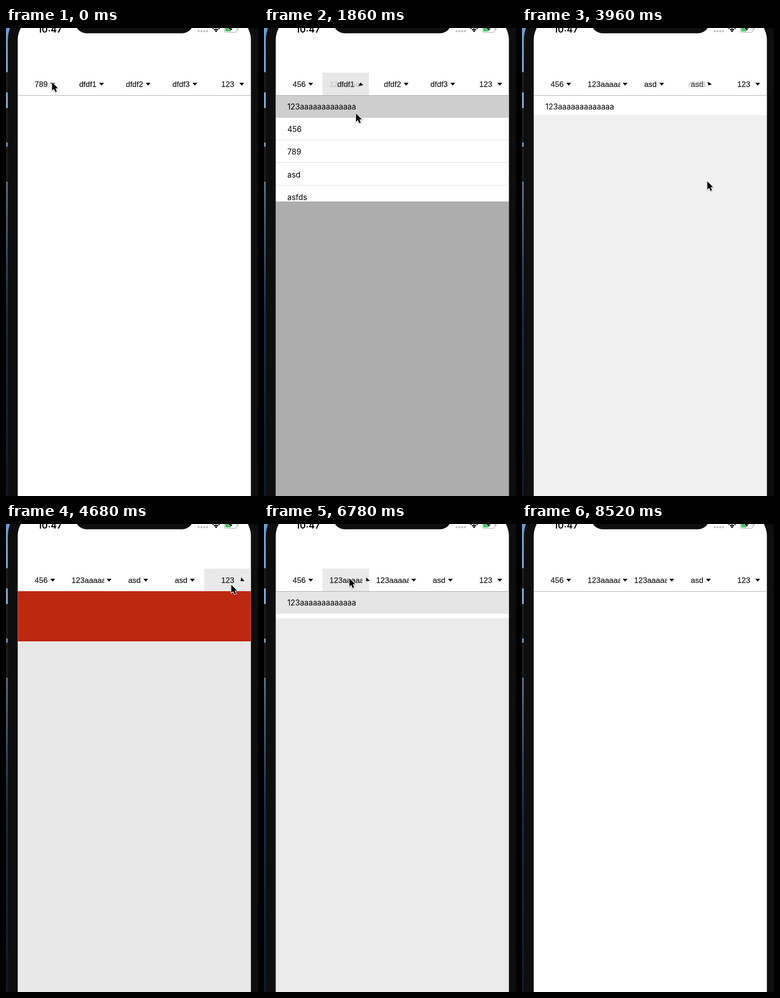
An HTML page with a canvas for the animation above (8.64 s loop, 550 by 1017 pixels).

```html
<!DOCTYPE html>
<html lang="en">
<head>
<meta charset="utf-8">
<title>Drop-down menu bar</title>
<style>
html, body { margin: 0; width: 100%; height: 100%; overflow: hidden; background: #0e0e0e; }
canvas { display: block; width: 550px; height: 1017px; }
</style>
</head>
<body>
<canvas id="stage"></canvas>
<script>
const W = 550, H = 1017, LOOP = 8640, STEP = 60;
const LEFT = 25.6, RIGHT = 534.5, SCREEN_TOP = -29.5, BEZEL = 21.6;
const BAR_TOP = 97, BAR_END = 146, TAB_W = (RIGHT - LEFT) / 5;
const ROW_H = 49.1, PANEL_H = 414, SLIDE = 300, DIM = .342, LABEL_MAX = 71;
const ROWS = ['123' + 'a'.repeat(13), '456', '789', 'asd', 'asfds'];
const START = ['789', 'dfdf1', 'dfdf2', 'dfdf3', '123'];
const TAB_FONT = '17px "Liberation Sans", Arial, sans-serif';
const ROW_FONT = '16.8px Inter, sans-serif';
const FRAME = '#0e0e0e';

// Each opened menu: its tab, times, height of the tap and the chosen row, if any.
const MENUS = [
  { tab: 0, open: 200, close: 850, tapY: 118, pick: 1 },
  { tab: 1, open: 1200, close: 1816, tapY: 125, pick: 0 },
  { tab: 2, open: 2180, close: 2560, tapY: 125, pick: 3 },
  { tab: 3, open: 2877, close: 3740, tapY: 132, pick: 3 },
  { tab: 4, open: 4579, close: 5245, tapY: 132, red: true },
  { tab: 2, open: 5850, close: 6230, tapY: 125, pick: 0 },
  { tab: 1, open: 6684, close: 8060, tapY: 118 }
];
const picks = menu => menu.pick !== undefined;

const canvas = document.getElementById('stage');
const ctx = canvas.getContext('2d');
const ratio = window.devicePixelRatio || 1;
canvas.width = W * ratio;
canvas.height = H * ratio;

const clamp = v => Math.min(1, Math.max(0, v));
const mix = (a, b, k) => a + (b - a) * k;
const ease = v => { const k = clamp(v); return k * k * (3 - 2 * k); };
const gray = v => { const n = Math.round(v); return `rgb(${n},${n},${n})`; };
const tabLeft = tab => LEFT + tab * TAB_W;

function rect(x, y, w, h, color) {
  ctx.fillStyle = color;
  ctx.fillRect(x, y, w, h);
}

function rounded(x, y, w, h, r, color) {
  ctx.beginPath();
  ctx.roundRect(x, y, w, h, r);
  if (color) {
    ctx.fillStyle = color;
    ctx.fill();
  }
}

function poly(points, color) {
  ctx.beginPath();
  points.forEach(([x, y]) => ctx.lineTo(x, y));
  ctx.closePath();
  ctx.fillStyle = color;
  ctx.fill();
}

function write(text, x, y, font, color = '#000', align = 'left') {
  ctx.font = font;
  ctx.textAlign = align;
  ctx.fillStyle = color;
  ctx.fillText(text, x, y);
}

// How far a menu is out, 0 to 1; lead starts the closing earlier.
function amount(menu, t, lead = 0) {
  return ease((t - menu.open) / SLIDE) * (1 - ease((t + lead - menu.close) / SLIDE));
}

function drawSurroundings() {
  const wall = ctx.createLinearGradient(0, 0, 0, H);
  wall.addColorStop(0, '#6d9ccf');
  wall.addColorStop(.17, '#7fa6cc');
  wall.addColorStop(.34, '#566878');
  wall.addColorStop(.6, '#14304e');
  wall.addColorStop(1, '#0b1a2c');
  rect(0, 0, W, H, wall);
  rect(0, 96, 4, 44, '#1c1c1c');
  rect(0, 174, 4, 75, '#1c1c1c');
  rect(0, 258, 4, 76, '#1c1c1c');
  rounded(LEFT - BEZEL, SCREEN_TOP - BEZEL, W + 100, H + 200, 56 + BEZEL, FRAME);
}

function drawStatus() {
  write('10:47', 96, 9.5, '600 20px Inter, sans-serif', '#000', 'center');
  rounded(151, -50, 258, 61.5, 25, FRAME);

  for (let i = 0; i < 4; i++) rounded(418 + i * 6.1, 4.6, 4.8, 4.8, 2.4, '#c4c4c4');

  ctx.strokeStyle = '#000';
  ctx.lineWidth = 2.6;
  for (const r of [6.5, 11]) {
    ctx.beginPath();
    ctx.arc(458.5, 9, r, -Math.PI * .75, -Math.PI * .25);
    ctx.stroke();
  }
  poly([[455.5, 6], [458.5, 4.8], [461.5, 6], [458.5, 9.2]], '#000');

  rounded(476.5, -5, 27.5, 14.5, 4);
  ctx.strokeStyle = '#a5a5a5';
  ctx.lineWidth = 1.2;
  ctx.stroke();
  rounded(478.5, -3, 12, 10.5, 2.5, '#35c759');
  rect(505.5, 0, 1.6, 4.5, '#a5a5a5');
  poly([[492, -6], [484.5, 3], [489.5, 3], [487.5, 9], [495.5, 0.5], [490.5, 0.5]], '#000');
  ctx.strokeStyle = '#fff';
  ctx.lineWidth = .8;
  ctx.stroke();
}

function labelState(tab, t) {
  let from = START[tab], to = from, k = 1;
  for (const m of MENUS) {
    if (m.tab !== tab || !picks(m) || t < m.close) continue;
    from = to;
    to = ROWS[m.pick];
    k = clamp((t - m.close) / SLIDE);
  }
  return { from, to, k };
}

function labelWidth(text) {
  ctx.font = TAB_FONT;
  return Math.min(LABEL_MAX, ctx.measureText(text).width);
}

function drawLabel(text, center, alpha) {
  const w = labelWidth(text), x = center - w / 2;
  ctx.save();
  ctx.globalAlpha = alpha;
  ctx.beginPath();
  ctx.rect(x - 1, BAR_TOP, w + 1.5, BAR_END - BAR_TOP);
  ctx.clip();
  write(text, x, 128, TAB_FONT, '#1a1a1a');
  ctx.strokeStyle = '#1a1a1a';
  ctx.lineWidth = .25;
  ctx.strokeText(text, x, 128);
  ctx.restore();
}

function drawTab(tab, t) {
  const x = tabLeft(tab), center = x + TAB_W / 2 + .3;
  let shade = 0, turn = 0;
  for (const m of MENUS.filter(m => m.tab === tab)) {
    shade += amount(m, t, picks(m) ? SLIDE / 2 : 0);
    turn += amount(m, t);
  }
  if (shade > 0) rect(x, BAR_TOP, TAB_W, BAR_END - BAR_TOP, gray(255 - 85 * shade));

  const { from, to, k } = labelState(tab, t);
  if (from !== to) drawLabel(from, center, 1 - k);
  drawLabel(to, center, from === to ? 1 : k);

  const half = mix(labelWidth(from), labelWidth(to), k) / 2;
  ctx.save();
  ctx.translate(center + half + (tab === 4 ? 16.5 : 11), 122);
  ctx.rotate(Math.PI * turn);
  poly([[-5.3, -3], [5.3, -3], [0, 3.3]], '#000');
  ctx.restore();
}

function selectedRow(t) {
  const done = MENUS.filter(m => picks(m) && t >= m.close - 100);
  return done.length ? done[done.length - 1].pick : -1;
}

function drawRows(p, edge, t) {
  const w = RIGHT - LEFT, chosen = selectedRow(t);
  ctx.save();
  ctx.beginPath();
  ctx.rect(LEFT, BAR_END + 1, w, Math.max(0, edge - BAR_END - 1));
  ctx.clip();
  rect(LEFT, BAR_END, w, H, '#fff');
  ROWS.forEach((text, i) => {
    const y = BAR_END + i * ROW_H;
    if (i === chosen) rect(LEFT, y, w, ROW_H, gray(237 - 33 * p));
    else rect(LEFT, Math.round(y + ROW_H) - 1, w, 1, '#dcdcdc');
    write(text, 51, y + 31.2, ROW_FONT);
  });
  ctx.restore();
}

function drawMenu(menu, t) {
  const p = amount(menu, t);
  if (p <= 0) return;
  const w = RIGHT - LEFT;
  const edge = Math.round(BAR_END + p * (menu.red ? PANEL_H : ROW_H * ROWS.length));
  rect(LEFT, edge, w, H - edge, `rgba(0,0,0,${DIM * p})`);
  if (menu.red) rect(LEFT, BAR_END, w, edge - BAR_END, '#bd2811');
  else drawRows(p, edge, t);
}

// The pointer rests on a tab, moves to a row or the dimmed area, then to the next tab.
function pointerAt(t) {
  const tap = m => [tabLeft(m.tab) + (m.tab ? 59 : 75), m.tapY];
  const target = m => picks(m)
    ? [tabLeft(m.tab) + 73.5, BAR_END + (m.pick + .81) * ROW_H]
    : [267, 343];
  let [x, y] = tap(MENUS[0]);
  const move = ([toX, toY], start, end) => {
    const k = ease((t - start) / (end - start));
    x = mix(x, toX, k);
    y = mix(y, toY, k);
  };
  for (const m of MENUS) {
    move(tap(m), m.open - 270, m.open - 30);
    move(target(m), m.open + 120, m.close - 60);
  }
  move([255, H + 30], 8160, 8460);
  return [x, y];
}

function drawPointer(t) {
  ctx.save();
  ctx.translate(...pointerAt(t));
  ctx.scale(.95, .95);
  ctx.shadowColor = 'rgba(0,0,0,.3)';
  ctx.shadowBlur = 2 * ratio;
  ctx.shadowOffsetY = ratio;
  poly([[0, 0], [0, 18.8], [4.3, 15], [7.4, 22], [10.8, 20.5], [7.8, 13.7], [13.2, 13.4]], '#000');
  ctx.strokeStyle = '#fff';
  ctx.lineWidth = 2.6;
  ctx.lineJoin = 'round';
  ctx.stroke();
  ctx.shadowColor = 'transparent';
  ctx.fill();
  ctx.restore();
}

function draw(t) {
  ctx.setTransform(ratio, 0, 0, ratio, 0, 0);
  drawSurroundings();
  ctx.save();
  rounded(LEFT, SCREEN_TOP, RIGHT - LEFT, H + 150, 56);
  ctx.clip();
  rect(0, 0, W, H, '#fff');
  drawStatus();
  START.forEach((_, tab) => drawTab(tab, t));
  rect(LEFT, BAR_END, RIGHT - LEFT, 1, '#a8a8a8');
  MENUS.forEach(menu => drawMenu(menu, t));
  ctx.restore();
  drawPointer(t);
}

const begin = performance.now();
function tick() {
  const t = (performance.now() - begin) % LOOP;
  draw(Math.floor(t / STEP) * STEP);
  requestAnimationFrame(tick);
}
tick();
</script>
</body>
</html>
```
